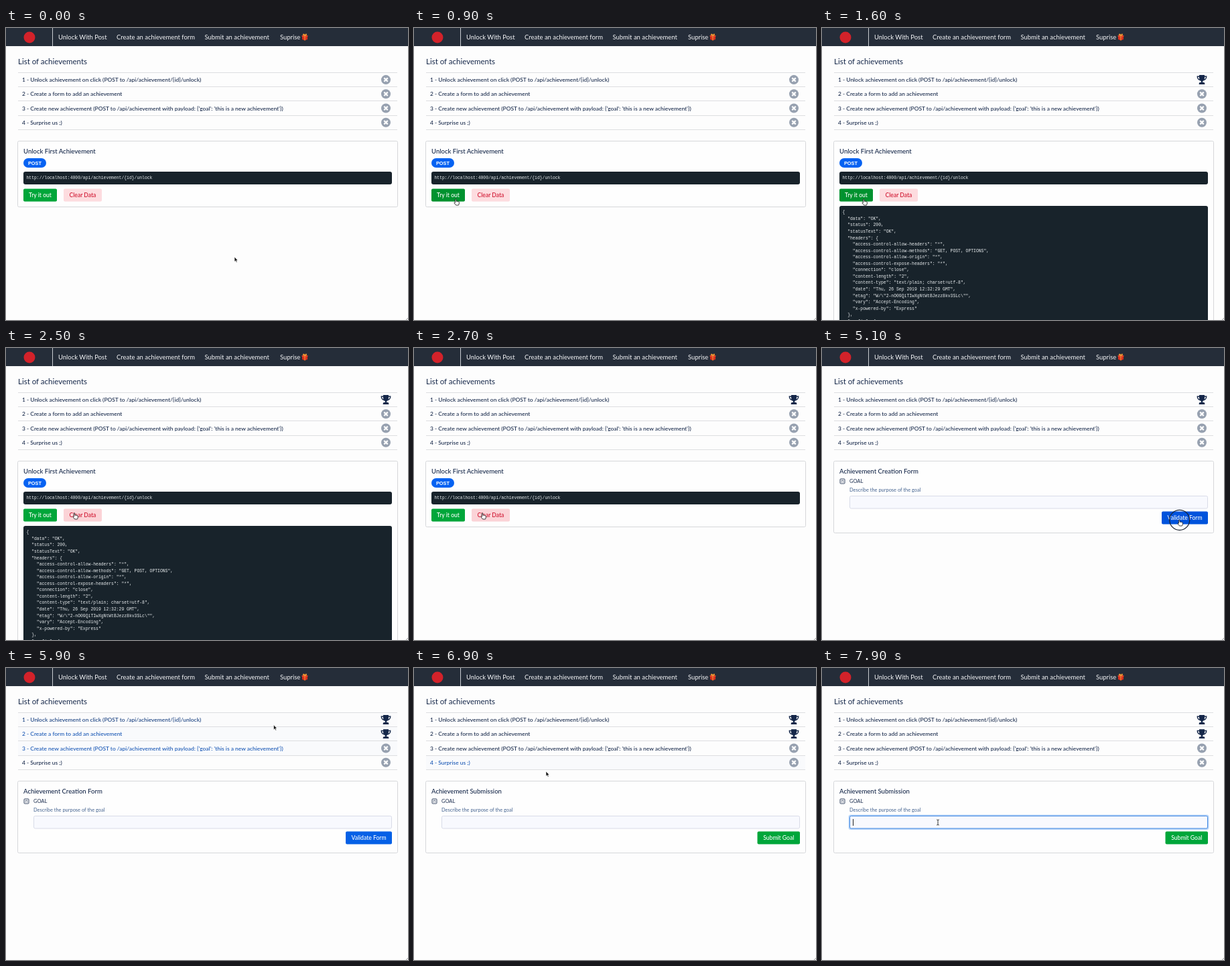
An HTML page for the animation above (8000 ms loop, 600x435 px).

```html
<!DOCTYPE html>
<html lang="en">
<head>
<meta charset="utf-8">
<title>Achievements</title>
<style>
  html, body { margin: 0; width: 100%; height: 100%; overflow: hidden; background: #fdfdfd; }
  svg { display: block; }
  text { font-family: Lato, sans-serif; white-space: pre; }
  .mono { font-family: "Liberation Mono", monospace; }
  .badge { font-family: "Liberation Sans", sans-serif; }
</style>
</head>
<body>
<svg id="stage" width="600" height="435" viewBox="0 0 600 435"></svg>
<script>
const LOOP = 8000, NAVY = '#16284a', CODE = '#18232b';
const stage = document.getElementById('stage');

// Pointer stops: time, x, y
const path = [
  [0, 341, 341], [150, 341, 341], [850, 62, 255], [1800, 62, 255],
  [2150, 102, 246], [2750, 102, 246], [3350, 188, 16], [3950, 188, 16],
  [4750, 533, 256], [5450, 533, 256], [6150, 345, 15], [6550, 345, 15],
  [6850, 197, 154], [6910, 197, 154], [7250, 173, 230], [8000, 173, 230]
];
const clicks = [1050, 2250, 3430, 4950, 6320];
const RING = 250;
const shown = { response: 1320, cleared: 2520, form: 3780, second: 5320, submit: 6570, focus: 7450 };

const rows = [
  '1 - Unlock achievement on click (POST to /api/achievement/{id}/unlock)',
  '2 - Create a form to add an achievement',
  "3 - Create new achievement (POST to /api/achievement with payload: {'goal': 'this is a new achievement'})",
  '4 - Surprise us ;)'
];
const response = String.raw`{
  "data": "OK",
  "status": 200,
  "statusText": "OK",
  "headers": {
    "access-control-allow-headers": "*",
    "access-control-allow-methods": "GET, POST, OPTIONS",
    "access-control-allow-origin": "*",
    "access-control-expose-headers": "*",
    "connection": "close",
    "content-length": "2",
    "content-type": "text/plain; charset=utf-8",
    "date": "Thu, 26 Sep 2019 12:32:29 GMT",
    "etag": "W/\"2-nO09QiTIwXgNtWtBJezz8kv3SLc\"",
    "vary": "Accept-Encoding",
    "x-powered-by": "Express"
  },
  "config": {`.split('\n');

const text = (x, y, str, size, fill = NAVY, attrs = '') =>
  `<text x="${x}" y="${y}" font-size="${size}" fill="${fill}" ${attrs}>${str}</text>`;
const rect = (x, y, w, h, fill, attrs = '') =>
  `<rect x="${x}" y="${y}" width="${w}" height="${h}" fill="${fill}" ${attrs}/>`;
const line = (d, stroke, width = 1) =>
  `<path d="${d}" fill="none" stroke="${stroke}" stroke-width="${width}"/>`;
const at = (x, y, body) => `<g transform="translate(${x} ${y})">${body}</g>`;
const mix = (a, b, u) => `rgb(${a.map((v, i) => Math.round(v + (b[i] - v) * u))})`;

function pointerAt(t) {
  const i = Math.max(1, path.findIndex(p => p[0] > t));
  const [t0, x0, y0] = path[i - 1], [t1, x1, y1] = path[i];
  const u = Math.max(0, (t - t0) / (t1 - t0)), e = u * u * (3 - 2 * u);
  return [x0 + (x1 - x0) * e, y0 + (y1 - y0) * e];
}

const inside = ([px, py], x, y, w, h) => px >= x && px < x + w && py >= y && py < y + h;

// Hover fades out over the 100 ms after the pointer has left a row
function rowHover(t, i) {
  let hits = 0;
  for (let k = 0; k < 10; k++) hits += inside(pointerAt(Math.max(0, t - k * 10)), 18, 66.5 + i * 21.2, 566, 21.2);
  return Math.min(1, hits / 2);
}

const nav = [
  [78, 71, 'Unlock With Post'], [165, 116, 'Create an achievement form'],
  [296.5, 97, 'Submit an achievement'], [409, 42, 'Suprise']
];

const gift = at(441, 8.5,
  `<path d="M1 3 5 1.5 9 3V8.5L5 10 1 8.5Z" fill="#d8301d"/>` +
  line('M.5 3.2 5 4.8 9.5 3.2', '#ef4a2c', 1.4) +
  line('M5 4V10M5 3.2Q1 2 3 .6 4.6 .6 5 3.2 6-.3 7.4 .8 8 2 5 3.2', '#f29a35', 1.1));

const header = () => rect(0, 0, 600, 27, '#252d39') + rect(69, 0, 1, 27, '#c9ccd1') +
  '<circle cx="35" cy="14" r="8.5" fill="#d3222a"/>' +
  nav.map(([x, , s]) => text(x, 17, s, 9.45, '#f6f7f9')).join('') + gift;

const cross = y => `<circle cx="567" cy="${y}" r="7" fill="#97a1b0"/>` +
  line(`M564.3 ${y - 2.7}l5.4 5.4m0-5.4l-5.4 5.4`, '#fff', 2.2);

const trophy = y => at(567, y,
  `<path d="M-4-7H4V-3Q4 1 1.2 2.2V4H3Q4.4 4.2 4.4 6.8H-4.4Q-4.4 4.2-3 4H-1.2V2.2Q-4 1-4-3Z" fill="${NAVY}"/>` +
  line('M-4-4.8H-6.7Q-6.7-.6-2.6 .5M4-4.8H6.7Q6.7-.6 2.6 .5', NAVY, 1.4));

const list = t => text(18, 54.3, 'List of achievements', 11.5) + rows.map((s, i) => {
  const y = 66.5 + i * 21.2, h = rowHover(t, i);
  const won = i == 0 && t >= shown.response || i == 1 && t >= shown.second;
  return rect(18, y, 566, 21, '#f9fafc', `opacity="${h}"`) +
    rect(18, Math.round(y - .5), 566, 1, '#dddee1') +
    text(24, y + 13.6, s, 8.45, mix([22, 40, 74], [20, 84, 180], h), 'font-weight="500"') +
    (won ? trophy : cross)(y + 10.6);
}).join('') + rect(18, 151, 566, 1, '#dddee1');

const panel = (h, title) =>
  rect(17.5, 168.5, 567, h, '#fefefe', 'rx="2" stroke="#d6d7da"') +
  text(26, 187, title, 9.55, NAVY, 'font-weight="500"');

function button(p, x, y, w, label, color, hover, ink = '#fff') {
  return rect(x, y, w, 19, inside(p, x, y, w, 19) ? hover : color, 'rx="2"') +
    text(x + w / 2, y + 12.7, label, 8.6, ink, 'text-anchor="middle" font-weight="500"');
}

const mono = (y, s) => text(30.5, y, s, 6.4, '#e9edef', 'class="mono"');

function requestPanel(p, open) {
  return panel(open ? 300 : 98, 'Unlock First Achievement') +
    rect(26, 194, 34, 14, '#0562f2', 'rx="7"') +
    text(43, 203.7, 'POST', 7.4, '#fff', 'class="badge" font-weight="700" text-anchor="middle"') +
    rect(26, 214, 550, 19, CODE, 'rx="3"') +
    mono(225.3, 'http://localhost:4000/api/achievement/{id}/unlock') +
    button(p, 26, 239.5, 50, 'Try it out', '#00a63a', '#00922f') +
    button(p, 86, 239.5, 57, 'Clear Data', '#fddcdf', '#fbd3d7', '#d0142f') +
    (open ? rect(26, 265, 550, 190, CODE, 'rx="3"') +
      response.map((s, i) => mono(276.3 + i * 9.56, s)).join('') : '');
}

function formPanel(p, t, submit) {
  const focus = t >= shown.focus;
  return panel(107, submit ? 'Achievement Submission' : 'Achievement Creation Form') +
    rect(27, 195, 7, 7, 'none', 'rx="1" stroke="#3b4a66"') +
    line('M28.5 197.3h4M28.5 199.6h1.5M31 199.6h1.5', '#3b4a66', .9) +
    text(41, 201.2, 'GOAL', 7.5) +
    text(41, 213.5, 'Describe the purpose of the goal', 7.45, '#43628f') +
    (focus ? rect(41, 220, 535, 19.5, 'none', 'rx="2" stroke="#b9d6fa" stroke-width="3"') : '') +
    rect(41.5, 220.5, 534, 18.5, '#f8f9fe', `rx="2" stroke="${focus ? '#3f86e0' : '#d9dce8'}"`) +
    (focus && (t - shown.focus) % 1000 < 500 ? rect(46, 225, 1, 10, '#222') : '') +
    (submit ? button(p, 512.5, 243.6, 63.5, 'Submit Goal', '#00a63a', '#00922f')
            : button(p, 507, 243.6, 69, 'Validate Form', '#0560e6', '#0053dc'));
}

const shapes = {
  arrow: '<path d="M0 0V7.2L1.7 5.7 2.9 8.2 4.1 7.6 2.9 5.2H5Z" fill="#111" stroke="#fff" stroke-width=".6"/>',
  hand: '<path d="M-.6 .4Q.2-.5 1 .4V3.3Q2 2.6 2.6 3.4 3.6 2.9 4 3.7 5 3.4 5.3 4.3V7L4.4 9H.6L-2 5.7Q-1.8 4.3-.6 5.3Z" fill="#fff" stroke="#111" stroke-width=".8"/>',
  beam: line('M-1.8-4Q0-4 0-3 0-4 1.8-4M0-3V3M-1.8 4Q0 4 0 3 0 4 1.8 4', '#222', .9)
};

function pointer(p, t, view) {
  const isForm = view != 'request';
  const overButton = isForm
    ? inside(p, view == 'form' ? 507 : 513, 244, 70, 19)
    : inside(p, 26, 239, 50, 20) || inside(p, 86, 239, 57, 20);
  const overNav = nav.some(([x, w]) => inside(p, x, 5, w, 18));
  const kind = overButton || overNav ? 'hand' : isForm && inside(p, 41, 220, 535, 20) ? 'beam' : 'arrow';
  const ring = clicks.some(c => t >= c && t < c + RING)
    ? '<circle cx=".7" cy=".3" r="15" fill="none" stroke="#1b2230" stroke-width="1.2"/>' : '';
  return at(p[0], p[1], ring + shapes[kind]);
}

function draw(now) {
  const t = now % LOOP, p = pointerAt(t);
  const view = t >= shown.submit ? 'submit' : t >= shown.form ? 'form' : 'request';
  const open = t >= shown.response && t < shown.cleared;
  stage.innerHTML = rect(0, 0, 600, 435, '#fdfdfd') + header() + list(t) +
    (view == 'request' ? requestPanel(p, open) : formPanel(p, t, view == 'submit')) +
    line('M597 435l3-3', '#8a8a8a', .8) + pointer(p, t, view);
  requestAnimationFrame(draw);
}
requestAnimationFrame(draw);
</script>
</body>
</html>
```
